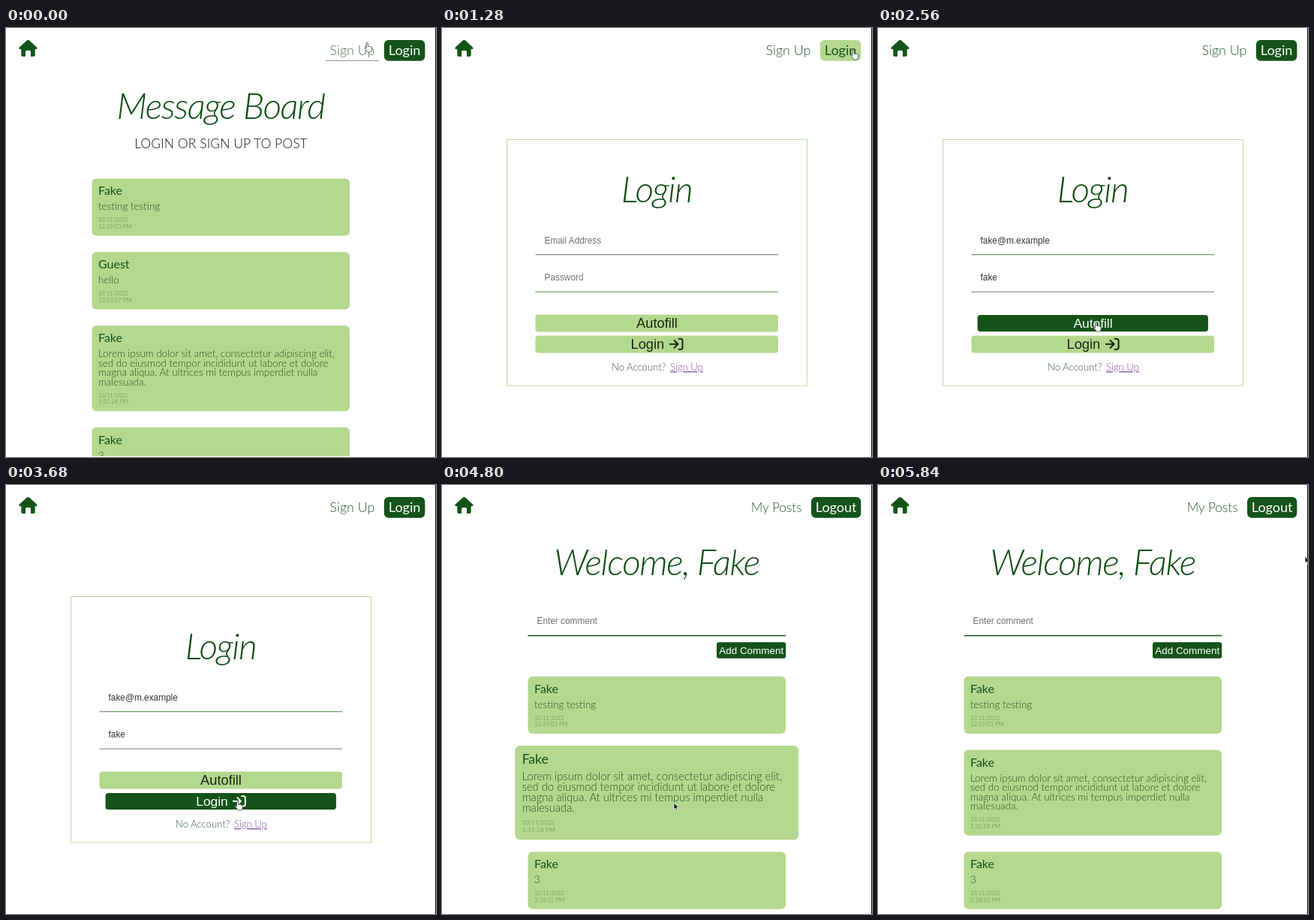
Write an HTML page that moves like this. It is 573 px wide and 571 px high and loops after 5920 ms.

```html
<!DOCTYPE html>
<html lang="en">
<head>
<meta charset="utf-8">
<title>Message Board</title>
<style>
  html, body { margin: 0; width: 100%; height: 100%; overflow: hidden; background: #fff; }
  svg { display: block; }
  text { font-family: Lato, sans-serif; font-weight: 300; white-space: pre; }
  .heading { font: italic 300 48px Lato, sans-serif; letter-spacing: -.03em; fill: #0f4d12; }
  .ui { font-family: "Liberation Sans", sans-serif; font-weight: 400; }
  .regular { font-weight: 400; }
</style>
</head>
<body>
<svg id="stage" width="573" height="571" viewBox="0 0 573 571"></svg>
<script>
const LOOP = 5920, STEP = 80;
const DARK = [20, 84, 24], LIGHT = [180, 216, 142], WHITE = [255, 255, 255], INK = [20, 40, 20];
const LOGIN_PAGE = 960, WELCOME_PAGE = 4080, FILLED = 2320;
const LINE_HEIGHT = 12.6;

const LOREM = ['Lorem ipsum dolor sit amet, consectetur adipiscing elit,',
  'sed do eiusmod tempor incididunt ut labore et dolore',
  'magna aliqua. At ultrices mi tempus imperdiet nulla', 'malesuada.'];
const POSTS = [
  { name: 'Fake', lines: ['testing testing'], time: '12:29:03 PM' },
  { name: 'Guest', lines: ['hello'], time: '12:53:57 PM' },
  { name: 'Fake', lines: LOREM, time: '1:31:24 PM' },
  { name: 'Fake', lines: ['3'], time: '2:18:52 PM' },
];

// Pointer stops: time, x, y
const PATH = [[0, 481, 19], [120, 481, 19], [480, 548, 29], [1360, 548, 29], [1920, 290.5, 391],
  [3200, 290.5, 391], [3440, 308.5, 420], [4080, 308.5, 420], [4160, 309, 423],
  [5280, 309, 423], [5700, 569, 95], [LOOP, 569, 95]];

// Hover periods: start, end
const HOVER = { signUp: [-999, 200], nav: [280, 1440], autofill: [1840, 3300],
  submit: [3300, 4080], card: [4480, 5400] };

const clamp = v => Math.max(0, Math.min(1, v));
const ease = v => v * v * (3 - 2 * v);
const rgb = c => `rgb(${c})`;
const mix = (a, b, k) => rgb(a.map((v, i) => Math.round(v + (b[i] - v) * k)));
const hovered = (key, t) => t >= HOVER[key][0] && t < HOVER[key][1];
const hover = (key, t) => {
  const [on, off] = HOVER[key];
  return ease(clamp((t - on) / 240)) - ease(clamp((t - off) / 240));
};

const text = (x, y, size, fill, content, attrs = '') =>
  `<text x="${x}" y="${y}" font-size="${size}" fill="${fill}" ${attrs}>${content}</text>`;
const rect = (x, y, w, h, r, fill, attrs = '') =>
  `<rect x="${x}" y="${y}" width="${w}" height="${h}" rx="${r}" fill="${fill}" ${attrs}/>`;
const line = (x1, x2, y, stroke, width = 1) =>
  `<path d="M${x1} ${y}H${x2}" stroke="${stroke}" stroke-width="${width}"/>`;
const scaled = (k, cx, cy, content) =>
  `<g transform="translate(${cx} ${cy}) scale(${k}) translate(${-cx} ${-cy})">${content}</g>`;
const heading = (y, content) =>
  `<text class="heading" x="286" y="${y}" text-anchor="middle">${content}</text>`;

const HOUSE = `<path fill="#145418" d="M29.5 16q1-.1 1.6 .6L41.3 26q.9 1.7-.9 2.2H38.7V36q0 2-2 2H33V31.5
  q0-1.5-1.5-1.5H27.5q-1.5 0-1.5 1.5V38H22.3q-2 0-2-2V28.2H18.4q-1.8-.5-.9-2.2L27.9 16.6q.7-.6 1.6-.6Z"/>`;
const HAND = `<path fill="#fff" stroke="#444" stroke-width=".9" stroke-linejoin="round" transform="scale(.9)"
  d="M-1 1q1.3-1.6 2.4 0V6h1q1-.6 1.8 .3q1-.5 1.7 .4q1.4-.2 1.5 1.2V11q0 3-3 3.5H1L-3.5 8.5q.6-1.6 2.5 0Z"/>`;
const ARROW = `<path fill="#111" stroke="#fff" stroke-width=".8"
  d="M0 0V9L2 7L3.5 10.5L5 9.9L3.6 6.6H6.4Z"/>`;

function nav(t) {
  const button = (x, label, fill, ink) => rect(x, 16, 558.3 - x, 27.7, 6, fill) +
    text((x + 558.3) / 2, 36, 18, ink, label, 'class="regular" text-anchor="middle"');
  if (t >= WELCOME_PAGE) {
    return text(411.7, 36, 17.2, '#2c5c2e', 'My Posts') + button(492, 'Logout', rgb(DARK), '#fff');
  }
  const k = hover('nav', t), over = hovered('signUp', t);
  return text(431.5, 36, 17.9, over ? '#567558' : '#2c5c2e', 'Sign Up') +
    (over ? line(426, 497, 43.5, '#8a9a8a') : '') +
    button(503.8, 'Login', mix(DARK, LIGHT, k), mix(WHITE, DARK, k));
}

function card(post, y, k = 0) {
  const extra = LINE_HEIGHT * (post.lines.length - 1), h = 76.2 + extra;
  const body = rect(114.5, y, 343.5, h, 6, rgb(LIGHT)) +
    text(123, y + 22, 16, '#12501a', post.name, 'class="regular"') +
    post.lines.map((s, i) => text(123, y + 42 + LINE_HEIGHT * i, 13.4, '#274f26', s)).join('') +
    text(123, y + 58 + extra, 7.1, '#5a8548', '10/11/2022') +
    text(123, y + 66.5 + extra, 7.8, '#5a8548', post.time);
  return { h, svg: scaled(1 + .1 * k, 286.25, y + h / 2, body) };
}

function cards(posts, y, growing, k) {
  return posts.map((post, i) => {
    const { h, svg } = card(post, y, i === growing ? k : 0);
    y += h + 21.6;
    return svg;
  }).join('');
}

const homePage = () => heading(121, 'Message Board') +
  text(286.5, 160, 17.6, '#101c12', 'LOGIN OR SIGN UP TO POST', 'text-anchor="middle"') +
  cards(POSTS, 200.4);

function formButton(y, k, content) {
  const color = mix(INK, WHITE, k);
  return scaled(1 - .05 * k, 286.25, y + 11.5,
    rect(124.5, y, 323.5, 23, 4, mix(LIGHT, DARK, k)) + content(color));
}

function loginPage(t) {
  const filled = t >= FILLED, gray = '#777', green = '#4c8046';
  const field = (y, hint, value, stroke) =>
    text(136.5, y, 11.85, filled ? '#333' : '#707070', filled ? value : hint, 'class="ui"') +
    line(124.5, 448, y + 15.2, stroke);
  const enterIcon = color => `<path fill="none" stroke="${color}" stroke-width="2" stroke-linecap="round"
    stroke-linejoin="round" d="M315.5 413.8h2.5q2.5 0 2.5 2.5v9q0 2.5-2.5 2.5h-2.5
    M303.8 420.8h10M309.5 415.8l5 5-5 5"/>`;
  return rect(86.5, 148.5, 400, 327.5, 0, 'none', 'stroke="#bddba0"') + heading(232, 'Login') +
    field(286.5, 'Email Address', 'fake@m.example', filled ? green : gray) +
    field(336, 'Password', 'fake', filled ? gray : green) +
    formButton(381.5, hover('autofill', t), c =>
      text(286.5, 399.3, 18.3, c, 'Autofill', 'class="ui" text-anchor="middle"')) +
    formButton(409.5, hover('submit', t), c =>
      text(251.5, 427.4, 18.3, c, 'Login', 'class="ui"') + enterIcon(c)) +
    text(226, 456, 13.1, '#3d5c40', 'No Account?') +
    text(304, 456, 13.1, '#8552a8', 'Sign Up', 'text-decoration="underline"');
}

const welcomePage = t => heading(120, 'Welcome, Fake') +
  text(126.5, 185, 11.85, '#707070', 'Enter comment', 'class="ui"') +
  line(114.5, 458, 200.5, '#145418', 1.4) +
  rect(366, 209.2, 92.2, 21.6, 3, rgb(DARK)) +
  text(412.2, 224.5, 13.45, '#fff', 'Add Comment', 'class="ui" text-anchor="middle"') +
  cards([POSTS[0], POSTS[2], POSTS[3]], 254.8, 1, hover('card', t));

function pointer(t) {
  const i = PATH.findIndex(stop => stop[0] > t);
  const [t0, x0, y0] = PATH[i - 1], [t1, x1, y1] = PATH[i];
  const k = ease((t - t0) / (t1 - t0));
  const hand = ['signUp', 'nav', 'autofill', 'submit'].some(key => hovered(key, t));
  return `<g transform="translate(${x0 + (x1 - x0) * k} ${y0 + (y1 - y0) * k})">${hand ? HAND : ARROW}</g>`;
}

function draw(t) {
  const page = t < LOGIN_PAGE ? homePage : t < WELCOME_PAGE ? loginPage : welcomePage;
  stage.innerHTML = rect(0, 0, 573, 571, 0, '#fff') + HOUSE + nav(t) + page(t) +
    rect(0, 570, 573, 1, 0, '#fff') + rect(572, 0, 1, 571, 0, '#111') + pointer(t);
}

const stage = document.getElementById('stage');
const start = performance.now();
let shown = -1;
function tick() {
  const t = Math.floor(((performance.now() - start) % LOOP) / STEP) * STEP;
  if (t !== shown) draw(shown = t);
  requestAnimationFrame(tick);
}
tick();
</script>
</body>
</html>
```
